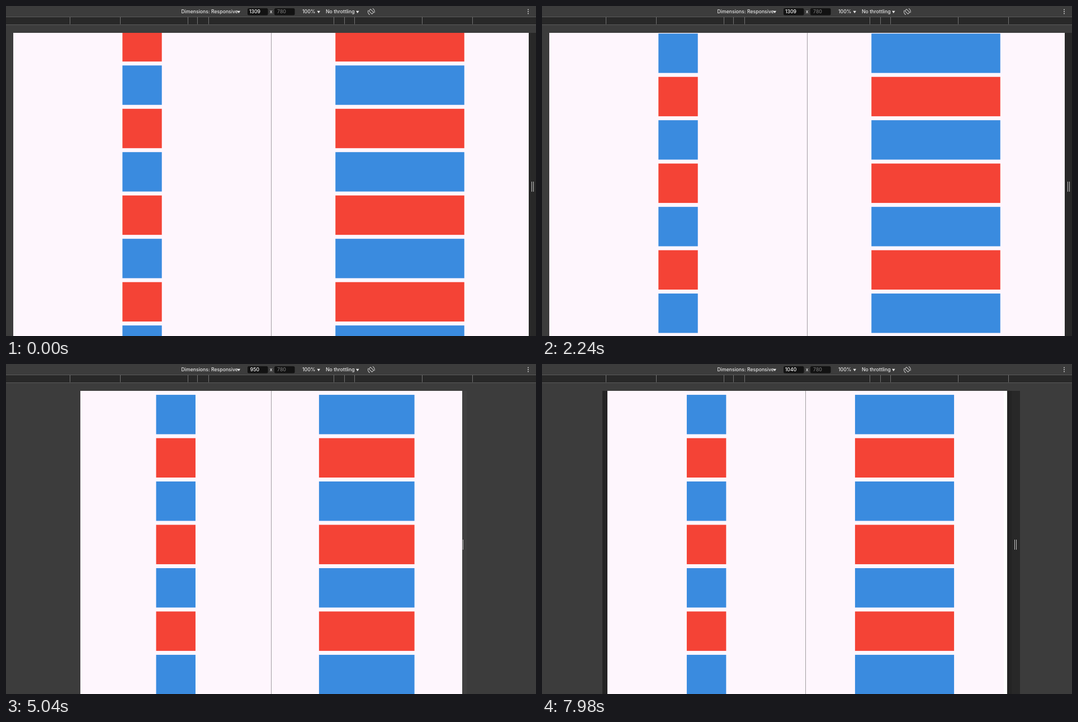
These frames come from a looping animation (948 px wide and 590 px high, 8000 ms). An HTML page with a canvas:

```html
<!DOCTYPE html>
<html lang="en">
<head>
<meta charset="utf-8">
<title>Responsive columns</title>
<style>
html, body { margin: 0; width: 100%; height: 100%; overflow: hidden; background: #3c3c3c; }
canvas { display: block; }
</style>
</head>
<body>
<canvas id="stage" width="948" height="590"></canvas>
<script>
const ctx = document.getElementById('stage').getContext('2d');
const LOOP = 8000, STEP = 70, SCALE = 0.7043, MID = 474.2, TOP = 48;
const RED = '#f44336', BLUE = '#3a8bdf', INK = '#e6e6e6';

// Keys are [time, value, slope].
const widthKeys = [
  [4200, 922, 0], [5040, 669, -.33], [5880, 398, -.1], [6510, 330, 0],
  [6720, 330, 0], [7070, 353.5, .16], [7560, 558, .42], [7980, 732.5, .42]
];
const scrollKeys = [
  [770, 0], [1120, 29], [1470, 29], [1750, 130], [1960, 130],
  [2240, 212], [2520, 212], [2730, 290], [2940, 290], [3150, 361.1]
];

function curve(keys, t) {
  if (t <= keys[0][0]) return keys[0][1];
  const i = keys.findIndex(k => k[0] >= t);
  if (i < 0) return keys[keys.length - 1][1];
  const [t0, a, m = 0] = keys[i - 1], [t1, b, n = 0] = keys[i];
  const d = t1 - t0, u = (t - t0) / d, v = 1 - u;
  return a * v * v * (1 + 2 * u) + b * u * u * (1 + 2 * v) + d * u * v * (m * v - n * u);
}

function rect(x, y, w, h, color) {
  ctx.fillStyle = color;
  ctx.fillRect(x, y, w, h);
}

function text(str, x, color = INK, align = 'left') {
  ctx.font = '500 8.7px Inter, "Liberation Sans", sans-serif';
  ctx.textAlign = align;
  ctx.fillStyle = color;
  ctx.fillText(str, x, 13.3);
}

function arrow(x) {
  ctx.fillStyle = INK;
  ctx.beginPath();
  ctx.moveTo(x - 2.8, 8.7);
  ctx.lineTo(x + 2.8, 8.7);
  ctx.lineTo(x, 13);
  ctx.fill();
}

function field(x, value, color) {
  ctx.fillStyle = '#121212';
  ctx.beginPath();
  ctx.roundRect(x, 4, 36.5, 12.5, 2.5);
  ctx.fill();
  text(value, x + 13, color, 'center');
}

function rotateIcon() {
  ctx.save();
  ctx.translate(653.3, 10);
  ctx.strokeStyle = '#c8c8c8';
  ctx.lineWidth = 1;
  ctx.rotate(-Math.PI / 4);
  ctx.strokeRect(-2.1, -4, 4.2, 8);
  for (let i = 0; i < 2; i++) {
    ctx.beginPath();
    ctx.arc(0, 0, 6, -.35, 1.15);
    ctx.stroke();
    ctx.rotate(Math.PI);
  }
  ctx.restore();
}

function toolbar(width) {
  rect(0, 0, 948, 19, '#3c3c3c');
  rect(0, 19, 948, 1, '#5b5b5b');
  rect(0, 20, 948, 13, '#282828');
  rect(0, 33, 948, 1, '#5b5b5b');
  for (const x of [114, 204, 325, 342, 362, 586, 605, 623, 744, 834])
    rect(x, 20, 1, 12.5, '#747474');
  text('Dimensions: Responsive', 313.5);
  text('100%', 530);
  text('No throttling', 572);
  [416.3, 559.2, 628.8].forEach(arrow);
  field(432, Math.round(width / SCALE), '#fff');
  field(480, 780, '#757575');
  text('x', 474.2, INK, 'center');
  rotateIcon();
  ctx.fillStyle = '#d0d0d0';
  for (const y of [6.6, 10, 13.4]) {
    ctx.beginPath();
    ctx.arc(934, y, 1, 0, 7);
    ctx.fill();
  }
}

function handleColor(t) {
  if (t < 3430 || t >= 7560) return '#282828';
  if (t < 3500) return '#343434';
  return t < 3780 ? '#424242' : '#404040';
}

function page(size, layout, scroll) {
  const left = Math.round(MID - size / 2), quarter = layout / 4;
  const period = 110 * SCALE, side = 100 * SCALE;
  ctx.save();
  ctx.beginPath();
  ctx.rect(left, TOP, Math.round(size), 590 - TOP);
  ctx.clip();
  rect(left, TOP, size + 1, 542, '#fff');
  rect(left, TOP, Math.round(layout), 542, '#fef6fd');
  rect(Math.round(left + layout / 2), TOP, 1, 542, '#a19da1');
  const first = 106.3 - period - scroll % (2 * period);
  for (let i = 0; i < 11; i++) {
    const y = first + i * period, color = i % 2 ? BLUE : RED;
    rect(left + quarter - side / 2, y, side, side, color);
    rect(left + 2.5 * quarter, y, quarter, side, color);
  }
  ctx.restore();
}

function draw(now) {
  const t = Math.floor(now % LOOP / STEP) * STEP;
  const width = curve(widthKeys, t);
  // The page repaints a little later than its frame, its layout later still.
  const size = curve(widthKeys, t - 41);
  const layout = Math.min(size, curve(widthKeys, t - 57));
  const left = Math.round(MID - width / 2), right = Math.round(MID + width / 2);

  rect(0, 0, 948, 590, '#3c3c3c');
  rect(left, TOP, right - left, 542, '#242424');
  rect(right, TOP, 15, 542, handleColor(t));
  rect(right + 5, 314, 1, 18, '#c4c4c4');
  rect(right + 8, 314, 1, 18, '#c4c4c4');
  page(size, layout, curve(scrollKeys, t));
  toolbar(width);
  requestAnimationFrame(draw);
}
requestAnimationFrame(draw);
</script>
</body>
</html>
```
